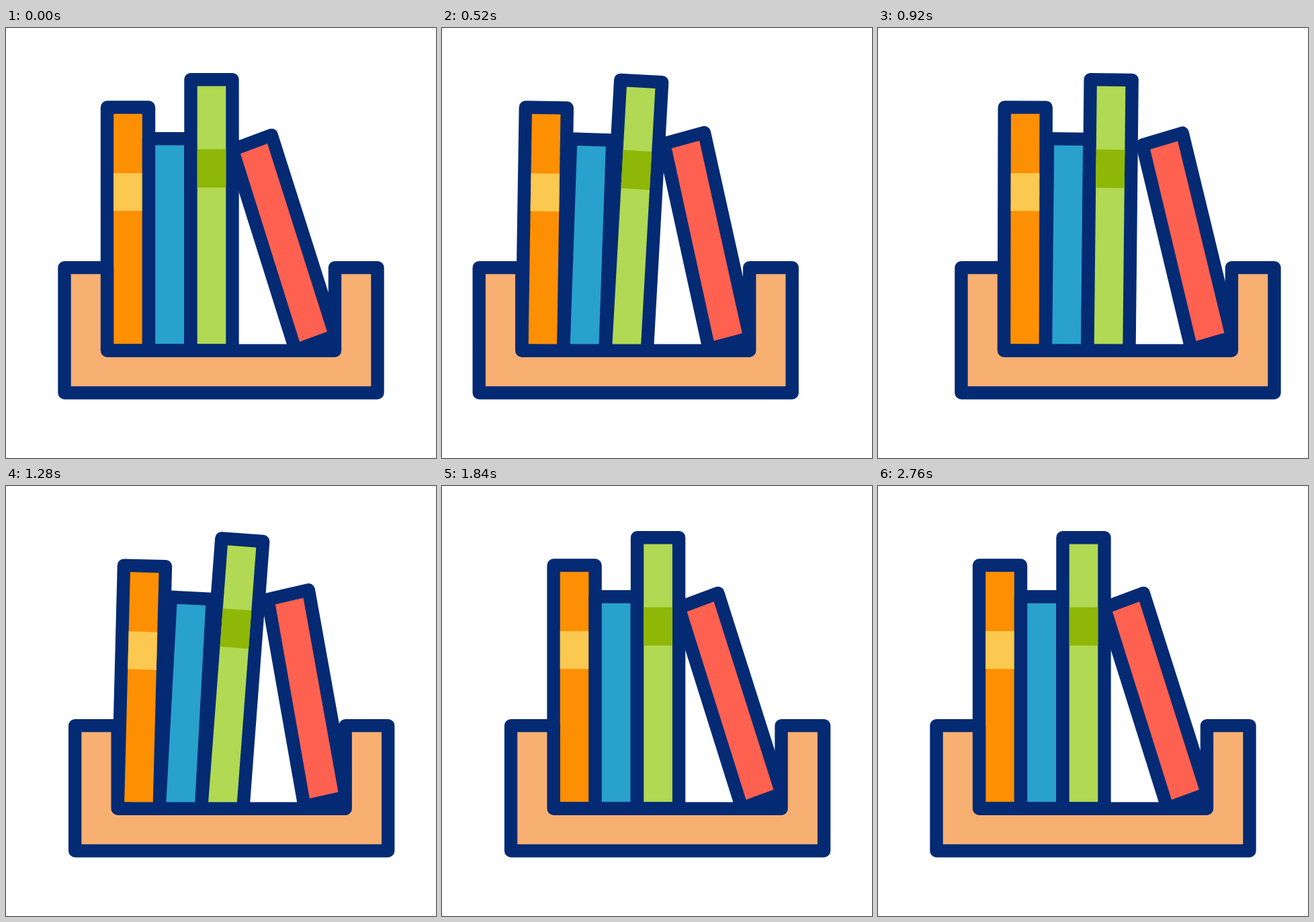
Recreate the animation shown at these times as an HTML page. Size 640x640 px, loop 3040 ms.

```html
<!DOCTYPE html>
<html lang="en">
<head>
<meta charset="utf-8">
<title>Books on a sliding shelf</title>
<style>
  html, body { margin: 0; height: 100%; overflow: hidden; background: #fff; }
  svg { display: block; width: 100%; height: 100%; }
  .line { stroke: #042a74; stroke-width: 19.4; stroke-linejoin: round; }
</style>
</head>
<body>
<svg viewBox="0 0 640 640">
  <g id="scene">
    <g id="red">
      <path class="line" fill="#ff6150" d="M337 181.2 395.2 159.4 490 457.8 430.8 479.6Z"/>
    </g>
    <g id="orange">
      <rect class="line" fill="#fd8f02" x="150.5" y="118" width="62" height="362"/>
      <path fill="#fbc850" d="M160.2 216h42.6v56.3h-42.6z"/>
    </g>
    <g id="blue">
      <rect class="line" fill="#28a1cd" x="212.5" y="164.7" width="62.2" height="315.3"/>
    </g>
    <g id="green">
      <rect class="line" fill="#b1d953" x="275" y="76.7" width="62" height="403.3"/>
      <path fill="#8fb707" d="M284.7 180.6h42.6v57h-42.6z"/>
    </g>
    <path class="line" fill="#f7b072" d="M87 356.6H150.5V480.2H489.5V356.6H553V543H87Z"/>
  </g>
</svg>
<script>
const LOOP = 3040, STEP = 40, SECOND_TILT = 690;

// [time, x] stops of the shelf
const slide = [[0, 0], [320, 20.2], [680, -69], [1040, 74], [1440, -16], [1800, 16], [2200, 0]];

// Each book tips over twice: pivot, peak angle, start / peak / end times
const books = [
  { id: 'orange', pivot: [150.5, 480], angle: 1.95, times: [360, 700, 960] },
  { id: 'blue', pivot: [212.5, 480], angle: 4, times: [340, 700, 989] },
  { id: 'green', pivot: [275, 480], angle: 4.5, times: [320, 630, 1006] },
  { id: 'red', pivot: [451, 460], angle: 9, times: [320, 687, 1120] }
];

// Smooth interpolation through [time, value] stops, held at both ends
function follow(stops, t) {
  const next = stops.findIndex(([time]) => time > t);
  if (next === 0) return stops[0][1];
  if (next < 0) return stops[stops.length - 1][1];
  const [t0, v0] = stops[next - 1], [t1, v1] = stops[next];
  const p = (t - t0) / (t1 - t0);
  return v0 + (v1 - v0) * p * p * (3 - 2 * p);
}

function tilt({ angle, times: [start, peak, end] }, t) {
  const stops = [[start, 0], [peak, angle], [end, 0]];
  return follow(stops, t) + follow(stops, t - SECOND_TILT);
}

const $ = id => document.getElementById(id);

function draw(now) {
  const t = Math.floor(now % LOOP / STEP) * STEP;
  $('scene').setAttribute('transform', `translate(${follow(slide, t)})`);
  for (const book of books)
    $(book.id).setAttribute('transform', `rotate(${tilt(book, t)} ${book.pivot})`);
  requestAnimationFrame(draw);
}

draw(performance.now());
</script>
</body>
</html>
```
